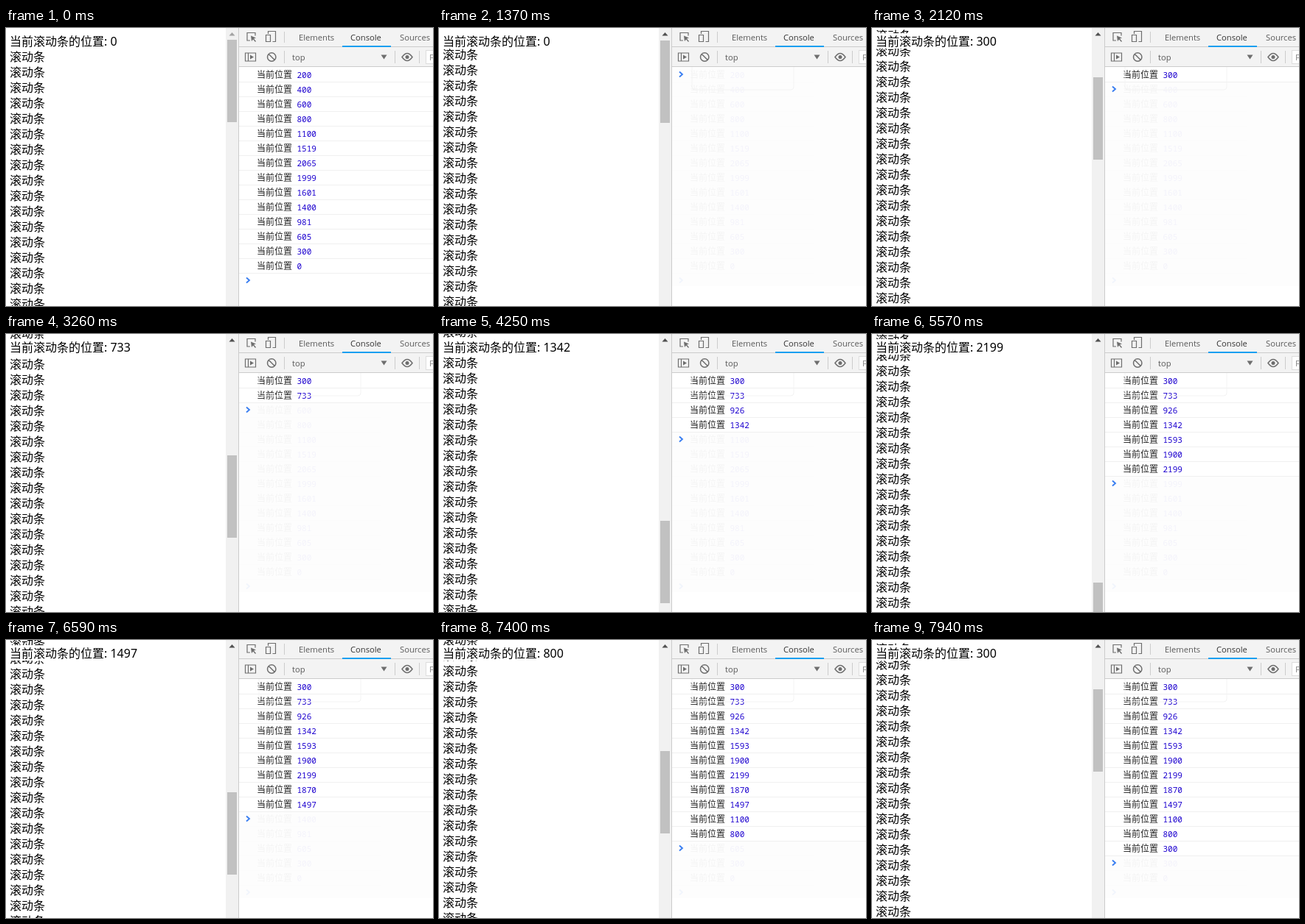
Write an HTML page that moves like this. It is 579 px wide and 378 px high and loops after 8 s.

```html
<!DOCTYPE html>
<html lang="zh-CN">
<head>
<meta charset="utf-8">
<title>滚动节流</title>
<style>
  html, body { margin: 0; width: 100%; height: 100%; overflow: hidden; background: #fff; }
  svg { display: block; }
  text { white-space: pre; }
  .page { font: 16px "Noto Sans", "Noto Sans CJK SC", "Noto Sans CJK", sans-serif; fill: #000; }
  .ui { font: 11.2px "Open Sans", sans-serif; fill: #5a5a5a; }
  .label { font: 12px "Noto Sans CJK SC", "Noto Sans CJK", sans-serif; fill: #222; }
  .number { font: 11px "Noto Sans Mono", monospace; fill: #1c00cf; }
  .icon { fill: none; stroke: #6e6e6e; stroke-width: 1.5; }
  .solid { fill: #6e6e6e; }
  .line { stroke: #ccc; stroke-width: 1; }
</style>
</head>
<body>
<svg width="579" height="378" viewBox="0 0 579 378">
  <rect width="579" height="378" fill="#fff"/>

  <g class="page">
    <g id="list"></g>
    <rect y="7" width="298" height="21" fill="#fff"/>
    <text id="header" x="5" y="24"></text>
  </g>
  <rect x="298" width="17" height="378" fill="#f1f1f1"/>
  <path id="arrow" d="M302.500 10.500h8l-4-4.500z"/>
  <rect id="thumb" x="300" width="13" height="112" fill="#c1c1c1"/>

  <rect id="haze" x="316" width="263" fill="#fdfdfd"/>
  <g id="oldRows"></g>
  <g id="newRows"></g>
  <path id="oldPrompt" class="prompt" d="M326 339.500l4 3.500-4 3.500"/>
  <path id="prompt" class="prompt" d="M326-3.500l4 3.500-4 3.500"/>
  <path id="outline" d="M343 53v27q0 4 4 4h130q4 0 4-4v-27" fill="none" stroke="#f3f3f3"/>

  <rect x="316" width="263" height="53" fill="#f3f3f3"/>
  <path class="line" d="M315.500 0v378M316 25.500h263M316 52.500h263M377.500 5v15M377.500 31v17M527.500 31v17M560.500 31v17"/>
  <rect x="456" y="24" width="66" height="2" fill="#1a9ff0"/>
  <g class="ui">
    <text x="397" y="17">Elements</text>
    <text x="467" y="17" style="fill:#333">Console</text>
    <text x="534" y="17">Sources</text>
    <text x="388" y="44">top</text>
  </g>
  <g class="icon">
    <path d="M331 17h-4v-10.500h11v4" stroke-width="1.200"/>
    <path class="solid" d="M332 10.500l7 3-3 1 3 3.500-1 1-3-3.500-2 2.500z" stroke="none"/>
    <path d="M355.500 8v-3.500h10v14h-4M352.500 9.500h6v9h-6z" stroke-width="1.200"/>
    <path d="M324.500 34h14v11h-14zM328.500 34v11" stroke-width="1.200"/>
    <path class="solid" d="M331 36.500l5 3-5 3z" stroke="none"/>
    <path id="clear" d="M354.500 39.500a5.700 5.700 0 1 0 11.400 0a5.700 5.700 0 1 0-11.400 0M356.300 35.500l8 8"/>
    <path class="solid" d="M508.500 36.500h8l-4 6z" stroke="none"/>
    <path d="M537 39.500q7-10 14 0q-7 10-14 0z"/>
    <circle class="solid" cx="544" cy="39.500" r="2.500" stroke="none"/>
  </g>
  <rect x="569.500" y="30.500" width="20" height="18" fill="#fff" stroke="#ddd"/>
  <text class="ui" x="574" y="44" style="fill:#888">F</text>

  <g id="tooltip">
    <rect x="345" y="54" width="134" height="28" rx="3" fill="#000" opacity=".1"/>
    <rect x="346" y="54" width="132" height="26" rx="2" fill="#f2f2f2"/>
    <text class="ui" x="354" y="71" style="fill:#333">Clear console</text>
    <text class="ui" x="432" y="71" style="fill:#8c8c8c">Ctrl + L</text>
  </g>
</svg>
<script>
  const LOOP = 8000, CLEAR_TIME = 800, LINE = 21, ROW = 20;
  const $ = id => document.getElementById(id);

  const oldLog = [200, 400, 600, 800, 1100, 1519, 2065, 1999, 1601, 1400, 981, 605, 300, 0];

  // [time, throttled position]
  const newLog = [
    [1880, 300], [2750, 733], [3290, 926], [3890, 1342], [4370, 1593], [4910, 1900],
    [5390, 2199], [5870, 1870], [6380, 1497], [6890, 1100], [7400, 800], [7940, 300]
  ];

  // [start, end, destination] of each smooth wheel scroll
  const scrolls = [
    [1340, 1590, 200], [1560, 1820, 300], [2094, 2360, 600], [2570, 2870, 800],
    [3140, 3464, 1100], [3680, 3980, 1400], [4210, 4490, 1700], [4490, 4790, 1900],
    [4880, 5180, 2200], [5360, 5570, 1900], [5810, 6110, 1500], [6350, 6655, 1100],
    [6860, 7160, 800], [7370, 7610, 500], [7580, 7820, 300]
  ];

  const progress = (t, start, end) => Math.min(1, Math.max(0, (t - start) / (end - start)));
  const ease = u => u * u * u * (u * (6 * u - 15) + 10);

  function scrollAt(t) {
    let from = 0, position = 0;
    for (const [start, end, to] of scrolls) {
      position += (to - from) * ease(progress(t, start, end));
      from = to;
    }
    return Math.round(position);
  }

  function buildRows(group, values) {
    group.innerHTML = values.map((value, i) => {
      const y = 53 + ROW * i;
      return `<g><rect x="316" y="${y + ROW}" width="263" height="1" fill="#f0f0f0"/>
        <text class="label" x="340" y="${y + 15}">当前位置</text>
        <text class="number" x="394.500" y="${y + 15}">${value}</text></g>`;
    }).join("");
    return [...group.children];
  }

  const oldRows = buildRows($("oldRows"), oldLog);
  const newRows = buildRows($("newRows"), newLog.map(entry => entry[1]));
  $("list").innerHTML = Array.from({ length: 130 }, (_, i) =>
    `<text x="5" y="${45 + LINE * i}">滚动条</text>`).join("");
  document.querySelectorAll(".prompt").forEach(p => {
    p.style.cssText = "fill:none;stroke:#367cf1;stroke-width:1.8";
  });

  function render(time) {
    // the screen refreshes every 30 ms
    const t = 20 + 30 * Math.floor((time - 19.5) / 30);
    const position = scrollAt(t);
    const logged = newLog.filter(entry => entry[0] <= t).length;
    const cleared = t >= CLEAR_TIME;
    const rowCount = cleared ? logged : oldLog.length;

    $("list").setAttribute("transform", `translate(0 ${-position})`);
    $("header").textContent = "当前滚动条的位置: " + (logged ? newLog[logged - 1][1] : 0);
    $("thumb").setAttribute("y", Math.round(16 + position * 0.1693));
    $("arrow").setAttribute("fill", position ? "#505050" : "#a3a3a3");

    oldRows.forEach((row, i) => {
      row.style.opacity = !cleared ? 1 : i < logged ? 0 : 0.04;
    });
    newRows.forEach((row, i) => { row.style.opacity = i < logged ? 1 : 0; });
    $("prompt").setAttribute("transform", `translate(0 ${63 + ROW * rowCount})`);
    $("oldPrompt").style.opacity = cleared ? 0.06 : 0;
    $("haze").setAttribute("y", 54 + ROW * rowCount);
    $("haze").setAttribute("height", cleared ? 297 - ROW * rowCount : 0);

    const hover = progress(t, 470, 620) * (1 - progress(t, 890, 1010));
    $("tooltip").style.opacity = hover;
    $("clear").style.stroke = hover > 0 ? "#333" : "#6e6e6e";
    $("outline").style.opacity = t >= 1010 ? 1 : 0;
  }

  function tick() {
    render(performance.now() % LOOP);
    requestAnimationFrame(tick);
  }
  tick();
</script>
</body>
</html>
```
